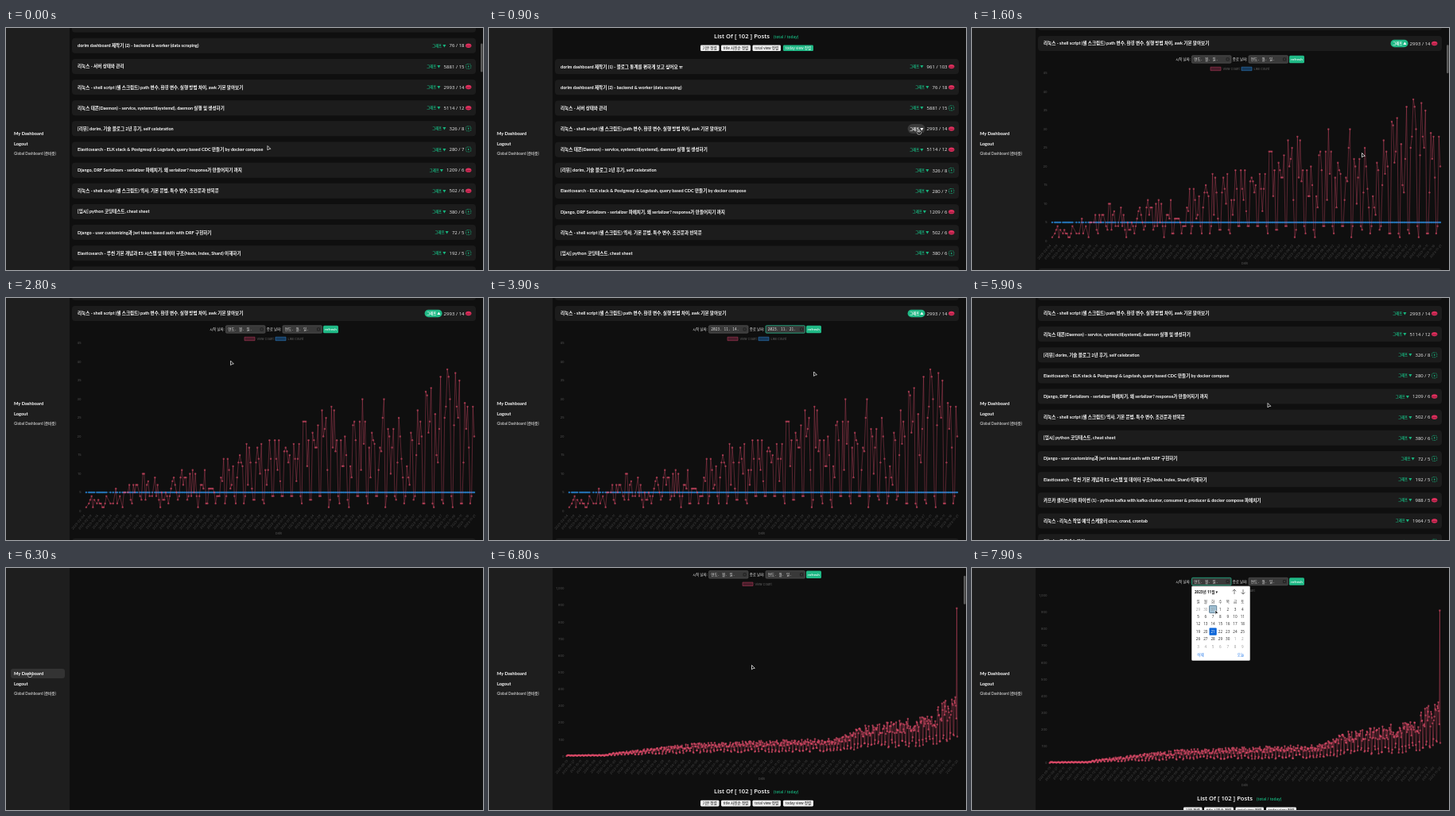
Recreate the animation shown at these times as an HTML page with a canvas. Size 600 px wide and 305 px high, loop 8 s.

```html
<!DOCTYPE html>
<html lang="ko">
<head>
<meta charset="utf-8">
<title>Dashboard</title>
<style>
html, body { margin: 0; width: 100%; height: 100%; overflow: hidden; background: #0f0f0f; }
canvas { display: block; width: 600px; height: 305px; }
</style>
</head>
<body>
<canvas id="stage"></canvas>
<script>
const stage = document.getElementById('stage'), c = stage.getContext('2d');
const dpr = window.devicePixelRatio || 1;
stage.width = 600 * dpr;
stage.height = 305 * dpr;

const LOOP = 8000, PITCH = 26.15, FIRST_ROW = 328.6, OPEN_ROW = 3, PANEL = 267;
const CHART_LEFT = 97.5, CHART_WIDTH = 491.5, CHART_HEIGHT = 211.5;
const GREEN = '#17b67f';
const CJK = '"Noto Sans CJK KR", "Noto Sans CJK", sans-serif';
const SANS = '"Open Sans", ' + CJK, TITLE = 'Lato, ' + CJK, MONO = '"Noto Sans Mono", ' + CJK;
const AXIS = 'Inter, sans-serif';

// title, total views, today's views, went up
const rows = [
  ['dorim dashboard 제작기 (1) - 벨로그 통계를 편하게 보고 싶어요 ㅠ'.replace('벨로그', '블로그'), 961, 103, true],
  ['dorim dashboard 제작기 (2) - backend & worker (data scraping)', 76, 18, true],
  ['리눅스 - 서버 상태와 관리', 5881, 15, false],
  ['리눅스 - shell script (셸 스크립트) path 변수, 환경 변수, 실행 방법 차이, awk 기본 알아보기', 2993, 14, true],
  ['리눅스 데몬(Daemon) - service, systemctl(systemd), daemon 실행 및 생성하기', 5114, 12, true],
  ['[리뷰] dorim, 기술 블로그 2년 후기, self celebration', 326, 8, false],
  ['Elasticsearch - ELK stack & Postgresql & Logstash, query based CDC 만들기 by docker compose', 280, 7, false],
  ['Django, DRF Serializers - serializer 파헤치기, 왜 serializer? response가 만들어지기 까지', 1209, 6, true],
  ['리눅스 - shell script (셸 스크립트) 역사, 기본 문법, 특수 변수, 조건문과 반복문', 502, 6, true],
  ['[임시] python 코딩테스트, cheat sheet', 380, 6, false],
  ['Django - user customizing과 jwt token based auth with DRF 구현하기', 72, 5, false],
  ['Elasticsearch - 루씬 기본 개념과 ES 시스템 및 데이터 구조(Node, Index, Shard) 이해하기', 192, 5, false],
  ['카프카 클러스터와 파이썬 (1) - python kafka with kafka cluster, consumer & producer & docker compose 파헤치기', 988, 5, true],
  ['리눅스 - 리눅스 작업 예약 스케줄러 cron, crond, crontab', 1964, 5, true],
  ['리눅스 - 프로세스 관리', 410, 4, false]
];

const clamp = v => Math.max(0, Math.min(1, v));
const easeOut = p => 1 - (1 - clamp(p)) ** 4;
const within = (t, from, to) => t >= from && t < to;

// piecewise linear curve through [at, value] points
function along(points, at) {
  const i = points.findIndex(p => p[0] >= at);
  if (i < 1) return points[0][1];
  const [x0, y0] = points[i - 1], [x1, y1] = points[i];
  return y0 + (y1 - y0) * (at - x0) / (x1 - x0);
}

function seeded(s) {
  return () => (s = (s * 16807) % 2147483647) / 2147483647;
}

// busy weekdays under a growing ceiling, quiet weekends; early days may be missing
function postViews(n) {
  const ceiling = [[0, 4], [.1, 6], [.15, 10], [.33, 12], [.45, 20], [.62, 28], [.79, 31], [.83, 17], [.87, 42], [.93, 42], [1, 31]];
  const rnd = seeded(77);
  return Array.from({ length: n }, (_, i) => {
    const u = i / (n - 1), r = rnd(), top = along(ceiling, u);
    if (rnd() < .35 - 1.6 * u) return null;
    return Math.max(1, Math.round(i % 7 < 2 ? 1 + 3.5 * r : top * (.3 + .7 * r)));
  });
}

function totalViews(n) {
  const ceiling = [[0, 7], [.1, 9], [.12, 22], [.33, 80], [.7, 115], [.76, 190], [.94, 255], [.955, 335], [1, 375]];
  const rnd = seeded(41);
  const data = Array.from({ length: n }, (_, i) => {
    const r = rnd();
    return along(ceiling, i / (n - 1)) * (i % 7 < 2 ? .25 + .25 * r : .62 + .38 * r);
  });
  data[n - 2] = 910;
  return data;
}

const post = postViews(291), total = totalViews(800), week = post.slice(-8);

function text(s, x, y, size, color = '#fff', { weight = 400, font = SANS, align = 'left' } = {}) {
  c.font = `${weight} ${size}px ${font}`;
  c.fillStyle = color;
  c.textAlign = align;
  c.fillText(s, x, y + size * .36);
}

function box(x, y, w, h, r, fill, stroke) {
  c.beginPath();
  c.roundRect(x, y, w, h, r);
  if (fill) { c.fillStyle = fill; c.fill(); }
  if (stroke) { c.strokeStyle = stroke; c.lineWidth = .7; c.stroke(); }
}

function polyline(points, color, width) {
  c.strokeStyle = color;
  c.lineWidth = width;
  c.lineJoin = 'round';
  c.beginPath();
  points.forEach(p => c.lineTo(...p));
  c.stroke();
}

const dayX = (i, n) => CHART_LEFT + CHART_WIDTH * i / (n - 1);

function series(data, max, y0, line, dot) {
  const points = data.map((v, i) => [dayX(i, data.length), v === null ? null : y0 - CHART_HEIGHT * v / max])
    .filter(p => p[1] !== null);
  polyline(points, line, .75);
  c.fillStyle = dot;
  for (const [x, y] of points) {
    c.beginPath();
    c.arc(x, y, 1.2, 0, 7);
    c.fill();
  }
}

function legend(x, y, name, fill, stroke) {
  box(x, y - 2.2, 13, 4.4, 0, fill, stroke);
  text(name, x + 15.5, y, 3.9, '#666', { font: AXIS });
}

function chart(oy, data, max, step, likes, grow) {
  const y0 = oy + 246, n = data.length, right = { align: 'right', font: AXIS };
  for (let v = 0; v <= max; v += step)
    text(v.toLocaleString('en-US'), 94.5, y0 - CHART_HEIGHT * v / max, 4, '#555', right);
  const every = Math.max(1, Math.round(n / 56));
  for (let i = 0; i < n; i += every) {
    c.save();
    c.translate(dayX(i, n) + 1, y0 + 5);
    c.rotate(-.86);
    text(new Date(Date.UTC(2023, 10, 22 - n + i)).toISOString().slice(0, 10), 0, 0, 4, '#484848', right);
    c.restore();
  }
  text('Date', 343, oy + 274, 4, '#555', { align: 'center', font: AXIS });
  legend(likes ? 300 : 319, oy + 29, 'View Count', '#4a1c2a', '#96364f');
  if (likes) {
    legend(339, oy + 29, 'Like Count', '#153a5c', '#2a6ca6');
    series(data.map(v => v && 5 * grow), max, y0, '#184a75', '#2470b0');
  }
  series(data.map(v => v && v * grow), max, y0, `rgba(235,80,112,${likes ? .45 : .5})`, 'rgba(230,78,108,.58)');
}

function dateBar(y, from, to, focus) {
  [['시작 날짜:', from, 276.5], ['종료 날짜:', to, 348]].forEach(([label, value, left], i) => {
    text(label, left - 1.8, y, 4.4, '#ddd', { align: 'right' });
    box(left, y - 4.7, 49.5, 9.4, 1.2, '#393939', focus === i + 1 ? '#20c997' : '#555');
    text(value || '연도. 월. 일.', left + 2.8, y, 4.5, '#e8e8e8', { font: MONO });
    box(left + 43.5, y - 1.6, 3.2, 3.2, .4, null, '#161616');
  });
  box(399, y - 4.7, 19, 9.4, 1.5, '#20b986');
  text('refresh', 408.5, y, 4.3, '#fff', { align: 'center', weight: 600 });
}

function arrow(x, y, dir) {
  polyline([[x, y - 3 * dir], [x, y + 3 * dir]], '#444', .7);
  polyline([[x - 2.3, y + .7 * dir], [x, y + 3 * dir], [x + 2.3, y + .7 * dir]], '#444', .7);
}

function picker(x, y, [mx, my]) {
  const center = { align: 'center' };
  box(x, y + 6, 73, 93.5, 1, '#fff', '#ccc');
  text('2023년 11월 ▾', x + 3.5, y + 13, 4.6, '#111', { weight: 700 });
  arrow(x + 53.5, y + 13, -1);
  arrow(x + 64.5, y + 13, 1);
  const colX = i => x + 8 + 9.3 * (i % 7);
  [...'일월화수목금토'].forEach((d, i) => text(d, colX(i), y + 25.3, 4.5, '#333', center));
  for (let i = 0; i < 42; i++) {
    const dx = colX(i), dy = y + 35 + 9.4 * Math.floor(i / 7);
    const day = new Date(Date.UTC(2023, 9, 29 + i)), today = i === 23;
    const hover = Math.abs(mx - dx) < 4.65 && Math.abs(my - dy) < 4.7;
    if (today) box(dx - 4.6, dy - 4.6, 9.2, 9.2, .8, '#0b65d8');
    else if (hover) box(dx - 4.6, dy - 4.6, 9.2, 9.2, .8, '#9fc0d4', '#375c78');
    text(day.getUTCDate(), dx, dy, 4.6, today ? '#fff' : day.getUTCMonth() === 10 ? '#222' : '#999', center);
  }
  text('삭제', x + 11, y + 92, 4.5, '#1a73e8', center);
  text('오늘', x + 61.5, y + 92, 4.5, '#1a73e8', center);
}

function badge(y, up) {
  if (up) {
    c.fillStyle = '#dc2f5c';
    c.beginPath();
    c.ellipse(581.7, y, 3.7, 2.7, 0, 0, 7);
    c.fill();
    box(578.8, y + .2, 5.8, .9, 0, '#8c1737');
  } else {
    c.setLineDash([1.8, .8]);
    box(578.6, y - 3, 6.2, 6, 1.6, null, GREEN);
    c.setLineDash([]);
    box(581.1, y - 1, 1.2, 2, 0, GREEN);
  }
}

function row([title, views, today, up], y, opened, hover) {
  box(83, y - 9.5, 508, 19, 4, '#1c1c1c');
  text(title, 90, y, 5.55, '#fff', { weight: 700, font: TITLE });
  const count = `${views} / ${today}`, lit = opened || hover, half = hover ? 6 : 4.8;
  text(count, 576.5, y, 6, '#eee', { align: 'right' });
  const right = 576.5 - c.measureText(count).width - 4;
  if (lit) box(right - 20, y - half, 22, 2 * half, half, opened ? '#20b986' : '#3a3a3a');
  text('그래프 ' + (opened ? '▲' : '▼'), right, y, 4.3, lit ? '#fff' : GREEN, { align: 'right', weight: 700 });
  badge(y, up);
}

function sortButtons(y, active) {
  [['기본 정렬', 266, 23.5], ['title 사전순 정렬', 292, 37], ['total view 정렬', 331.5, 35.5], ['today view 정렬', 370, 38]]
    .forEach(([label, x, w], i) => {
      const on = active && i === 3;
      box(x, y - 3.8, w, 7.6, 1.4, on ? '#20b986' : '#eee');
      text(label, x + w / 2, y, 4.6, on ? '#fff' : '#111', { align: 'center' });
    });
}

function sidebar(hover) {
  box(0, 0, 80, 305, 0, '#1e1e1e');
  if (hover) box(6, 127, 68, 12, 3, '#333');
  text('My Dashboard', 10, 133.2, 5.7, '#fff', { weight: 700, font: TITLE });
  text('Logout', 10, 146, 5.7, '#fff', { weight: 700, font: TITLE });
  text('Global Dashboard (준비중)', 10, 158.3, 4.6, '#bbb', { weight: 700, font: TITLE });
}

function cursor([x, y], hand) {
  if (hand) {
    box(x - 2.2, y + .8, 4.6, 3.6, 1.2, '#000', '#eee');
    box(x - .7, y - 1.2, 1.4, 3.4, .7, '#000', '#eee');
    return;
  }
  c.beginPath();
  [[0, 0], [0, 5.4], [1.6, 4.1], [3.8, 3.8]].forEach(([dx, dy]) => c.lineTo(x + dx, y + dy));
  c.closePath();
  c.fillStyle = '#000';
  c.strokeStyle = '#eee';
  c.lineWidth = .8;
  c.fill();
  c.stroke();
}

// arrival time, x, y; the pointer rests until it has to leave
const stops = [[0, 329, 148.5], [900, 541, 129.5], [1600, 490.5, 157.5], [2100, 125, 240], [2900, 322, 39],
  [3200, 304, 92], [3500, 393, 39], [3700, 409, 129], [4200, 408, 39], [4700, 110, 230], [5200, 570, 140],
  [5500, 537, 19], [5900, 372, 132.5], [6100, 30, 133], [6800, 330.5, 122.5], [7500, 322, 17], [7900, 306, 53]];

function pointer(t) {
  const i = stops.findIndex(s => s[0] >= t);
  if (i < 1) return stops[0].slice(1);
  const [t0, x0, y0] = stops[i - 1], [t1, x1, y1] = stops[i];
  const p = clamp(1 - (t1 - t) / Math.min(500, t1 - t0));
  return [x0 + (x1 - x0) * p, y0 + (y1 - y0) * p];
}

function scrollAt(t) {
  if (t >= 6200) return 25 * Math.max(0, 1 - Math.abs(t - 6650) / 230);
  return 332.5 - 52.5 * clamp((t - 100) / 500) + 107.6 * clamp((t - 1100) / 400);
}

function draw(t) {
  const scroll = scrollAt(t), mouse = pointer(t);
  const opened = within(t, 1100, 5600), reloaded = t >= 6200;
  const grow = start => easeOut((t - start) / 600);

  c.setTransform(dpr, 0, 0, dpr, 0, 0);
  box(0, 0, 600, 305, 0, '#0f0f0f');

  if (!within(t, 6200, 6400)) {
    if (scroll < 300) {
      chart(-scroll, total, 1000, 100, false, reloaded ? grow(6450) : 1);
      dateBar(17 - scroll, '', '', t >= 7600 ? 1 : 0);
    }
    text('List Of [ 102 ] Posts', 283, 290 - scroll, 7.7, '#fff', { weight: 600 });
    text('(total / today)', 358, 291 - scroll, 4.8, GREEN, { weight: 600 });
    sortButtons(305.3 - scroll, !reloaded);

    rows.forEach((r, i) => {
      const y = FIRST_ROW + PITCH * i - scroll + (opened && i > OPEN_ROW ? PANEL : 0);
      const here = i === OPEN_ROW;
      if (y > -12 && y < 317) row(r, y, opened && here, here && within(t, 900, 1100));
    });

    if (opened) {
      const top = FIRST_ROW + PITCH * OPEN_ROW + 3 - scroll, weekly = t >= 4300;
      if (weekly) chart(top, week, 35, 5, true, grow(4200));
      else chart(top, post, 45, 5, true, grow(1000));
      const focus = weekly || t < 3000 ? 0 : t < 3500 ? 1 : 2;
      dateBar(top + 17, t >= 3300 && '2023. 11. 14.', t >= 3800 && '2023. 11. 21.', focus);
      if (within(t, 3000, 3300)) picker(276.5, top + 17, mouse);
      if (within(t, 3500, 3800)) picker(348, top + 17, mouse);
    }
    if (t >= 7600) picker(276.5, 17, mouse);
  }

  const overMenu = within(t, 6100, 6400);
  sidebar(overMenu);
  if (t < 700 || within(t, 1200, 2000) || within(t, 6600, 7300))
    box(597, 9.5 + scroll * .03, 2.6, 36, 1.3, '#5a5a5a');
  cursor(mouse, overMenu || within(t, 900, 1200) || within(t, 4200, 4400) || within(t, 5500, 5700));
}

let shown = -1;
function tick(now) {
  const t = Math.floor(now % LOOP / 100) * 100;
  if (t !== shown) draw(shown = t);
  requestAnimationFrame(tick);
}
tick(0);
</script>
</body>
</html>
```
